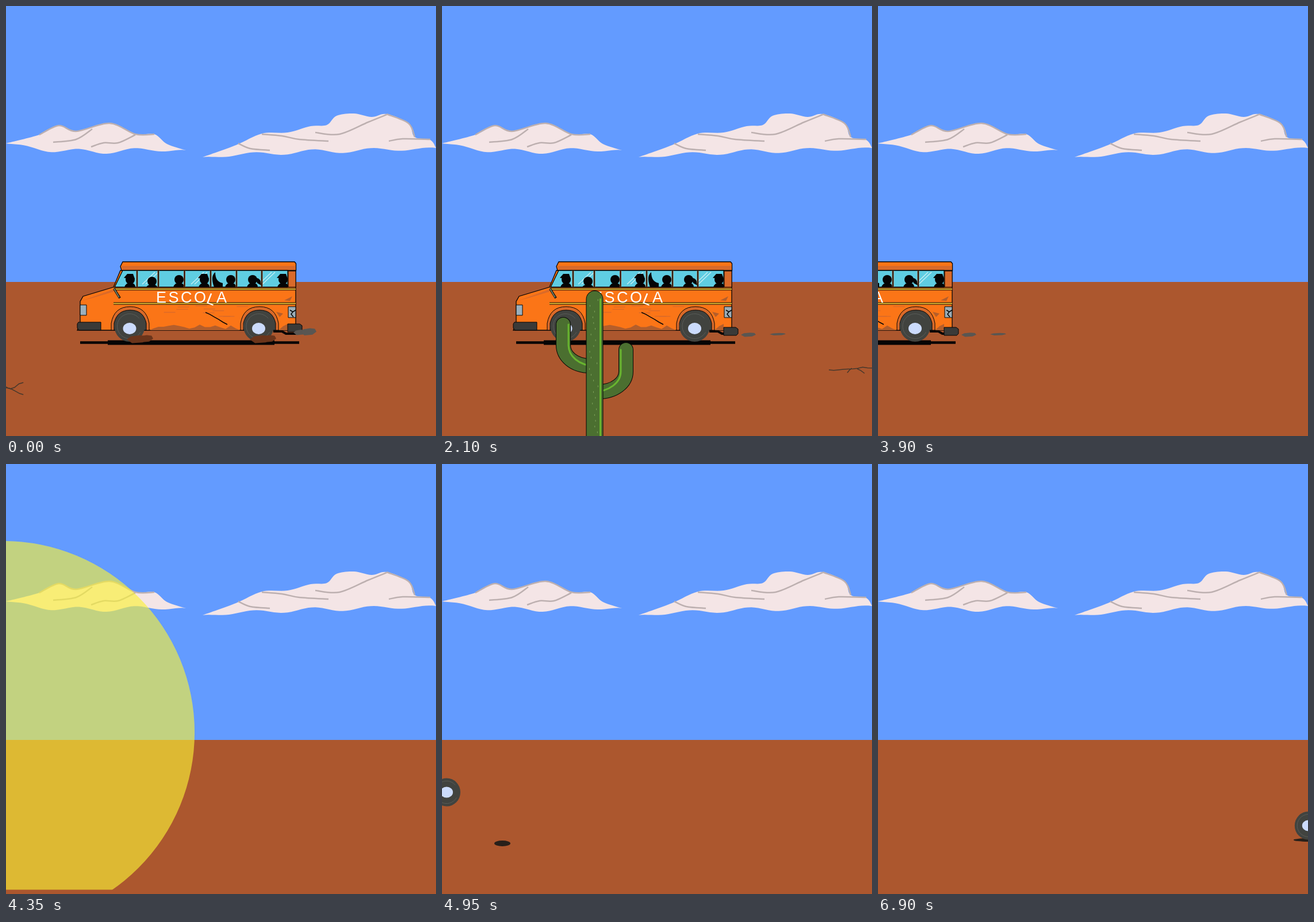
Write an HTML page with a canvas that moves like this. It is 748 px wide and 748 px high and loops after 7.05 s.

```html
<!DOCTYPE html>
<html lang="pt">
<head>
<meta charset="utf-8">
<title>School bus in the desert</title>
<style>
html, body { margin: 0; width: 100%; height: 100%; overflow: hidden; }
canvas { display: block; }
</style>
</head>
<body>
<canvas id="stage" width="748" height="748"></canvas>
<script>
const c = document.getElementById('stage').getContext('2d');
const STEP = 150, STEPS = 47;
const BLACK = '#050505', ORANGE = '#fb7517', DEEP = '#d96a2a', RUST = '#b45e2b',
      TYRE = '#41433f', HUB = '#cbdbfc', CLOUD = '#f4e5e6', SHADE = '#bdb0b0',
      SMOKE = '#595652', DUST = '#6b351b', CRACK = '#47382c', CACTUS = '#4b6f30';

const random = n => Math.abs(Math.sin(n * 12.9898) * 43758.5453) % 1;

function path(d, fill, stroke, width = 1) {
  const p = new Path2D(d);
  if (fill) { c.fillStyle = fill; c.fill(p); }
  if (stroke) { c.strokeStyle = stroke; c.lineWidth = width; c.stroke(p); }
}
function rect(x, y, w, h, fill, stroke) {
  path(`M${x},${y}h${w}v${h}h${-w}z`, fill, stroke);
}
function line(x0, y0, x1, y1, color, width) {
  path(`M${x0},${y0}L${x1},${y1}`, null, color, width);
}
function oval(x, y, rx, ry, fill, stroke) {
  path(`M${x - rx},${y}a${rx},${ry} 0 1 0 ${2 * rx},0a${rx},${ry} 0 1 0 ${-2 * rx},0z`, fill, stroke);
}
function at(x, y, draw) {
  c.save();
  c.translate(x, y);
  draw();
  c.restore();
}

// Smooth path through a few [x, y] points
function curve(pts) {
  let d = `M${pts[0]}`;
  for (let i = 0; i < pts.length - 1; i++) {
    const p = pts[i], q = pts[i + 1], before = pts[i - 1] || p, after = pts[i + 2] || q;
    const lead = [0, 1].map(j => p[j] + (q[j] - before[j]) / 6);
    const tail = [0, 1].map(j => q[j] - (after[j] - p[j]) / 6);
    d += `C${lead} ${tail} ${q}`;
  }
  return d;
}

// Top edge from points, bottom edge as a tapering ripple between its ends
function cloud(top, sag, ripple, wave, crest, creases) {
  const [x0, y0] = top[0], [x1, y1] = top[top.length - 1];
  let d = curve(top);
  for (let x = x1; x > x0; x -= 6) {
    const u = (x - x0) / (x1 - x0), taper = Math.sin(Math.PI * u);
    const y = y0 + (y1 - y0) * u + sag * taper * (1 - u)
      + ripple * Math.sqrt(taper) * Math.cos(2 * Math.PI * (x - crest) / wave);
    d += `L${x},${y}`;
  }
  path(d + 'z', CLOUD);
  for (const crease of creases) path(curve(crease), null, SHADE, 2.5);
}

function scenery() {
  rect(0, 0, 748, 480, '#639bff');
  rect(0, 480, 748, 268, '#ac572e');
  const left = [[0, 239], [58, 224], [92, 208], [122, 218], [180, 204], [225, 223], [258, 223], [280, 240], [313, 251]];
  cloud(left, 16, 4.5, 100, 75, [
    left.slice(1, 7),
    [[82, 237], [122, 232], [150, 214]],
    [[148, 245], [170, 238], [195, 238], [225, 224]]
  ]);
  const right = [[342, 263], [400, 242], [445, 222], [490, 220], [530, 209], [558, 207], [575, 191], [605, 187],
    [636, 193], [662, 188], [700, 204], [711, 228], [738, 233], [748, 247]];
  cloud(right, -4, 4, 104, 482, [
    right.slice(9, 12),
    [[404, 239], [425, 248], [459, 251]],
    [[445, 223], [480, 226], [510, 232], [561, 235]],
    [[538, 220], [580, 223], [630, 202], [662, 189]],
    [[666, 235], [690, 231], [738, 232]]
  ]);
}

function crack(x0, y0, x1, y1, color = CRACK) {
  const n = Math.ceil(Math.hypot(x1 - x0, y1 - y0) / 9);
  let d = `M${x0},${y0}`;
  for (let i = 1; i <= n; i++) {
    const jitter = i < n ? random(x0 + i) * 3 - 1.5 : 0;
    d += `L${x0 + (x1 - x0) * i / n},${y0 + (y1 - y0) * i / n + jitter}`;
  }
  path(d, null, color, 1.5);
}
function forkedCrack() {
  crack(377, 663, 465, 665);
  crack(465, 666, 488, 655);
  crack(455, 661, 488, 676);
}
function flatCrack() {
  crack(673, 633, 782, 627);
  crack(713, 630, 705, 638);
  crack(722, 631, 735, 639);
}

function bone(x0, y0, x1, y1, color, grow) {
  line(x0, y0, x1, y1, color, 4 + grow);
  for (const [x, y] of [[x0, y0], [x1, y1]])
    for (const side of [-1, 1]) oval(x - side * 1.2, y + side * 2, 2 + grow / 2, 2 + grow / 2, color);
}
function skull() {
  const bones = '#b9aaa2', ink = '#3c332f';
  oval(422, 640, 13, 4, '#87421f');
  path('M412,636Q404,626 410,621Q419,613 428,621Q434,628 427,636L425,642H413z', bones, ink, 1.2);
  for (const x of [414, 425]) oval(x, 629, 3.5, 3, ink);
  for (const x of [416, 419, 422]) line(x, 638, x, 642, ink);
  path('M419,633v3M417,619l4,3-2,3', null, ink);
  bone(384, 643, 407, 652, ink, 2);
  bone(384, 643, 407, 652, bones, 0);
}

function cactus() {
  const limbs = [
    ['M258,626C228,626 211,608 211,590V554', 24, 9],
    ['M272,671C300,671 320,655 320,636V598', 24, -9],
    ['M265.500,770V510', 28, 10]
  ];
  c.lineCap = 'round';
  for (const [d, width, edge] of limbs) {
    path(d, null, BLACK, width + 2);
    path(d, null, CACTUS, width);
    at(edge, 0, () => path(d, null, '#68b52f', 3));
  }
  c.lineCap = 'butt';
  for (let i = 0; i < 24; i++) rect(256 + 16 * random(i + 1), 510 + i * 10, 1, 3, '#7da05a');
}

function wheel(x, y, r) {
  oval(x, y, r - .5, r, TYRE);
  c.beginPath();
  c.arc(x, y, r * .8, .5, 5.6);
  c.strokeStyle = '#5a5c58';
  c.lineWidth = 1;
  c.stroke();
}

function riders(waving) {
  [216, 254, 301, 345, 391, 429, 482].forEach((x, i) => {
    const y = i === 1 ? 479 : 476;
    oval(x, y, 8, 8, BLACK);
    path(`M${x - 10},489Q${x - 8},${y + 6} ${x},${y + 5}Q${x + 9},${y + 6} ${x + 9},489z`, BLACK);
    if (i % 3 === 0) path(`M${x - 11},${y - 3}L${x - 5},${y - 10}H${x + 5}L${x + 8},${y - 1}z`, BLACK);
  });
  path('M434,473Q444,473 444,486L437,482z', BLACK);
  // raised arm
  const hand = waving ? 370 : 364;
  path(`M${hand},463Q355,470 362,489H377V482Q364,480 ${hand},463z`, BLACK);
}

function lettering() {
  c.fillStyle = '#fff';
  c.font = '27px "Liberation Sans", Arial, sans-serif';
  c.letterSpacing = '3.5px';
  c.fillText('ESCO', 261, 516);
  c.fillText('A', 366, 516);
  at(347, 516, () => { c.rotate(.38); c.fillText('L', 0, 0); });
}

function wear() {
  let rust = 'M250,564';
  for (let x = 256; x < 408; x += 9) rust += `L${x},${554 + 8 * random(x)}`;
  path(rust + 'L408,564zM474,564L482,557 490,553V564zM470,532l12,3-6,6zM484,512l14,-7-4,8z', RUST);
  for (let i = 0; i < 10; i++) {
    const x = 270 + 160 * random(i + 3), y = 520 + 25 * random(i + 40);
    line(x, y, x + 20, y, DEEP, 1.3);
  }
  crack(347, 533, 385, 554, BLACK);
}

function busBody(up) {
  // cabin and hood
  path('M199,460H504V564H124L129,550V514L134,505 187,489z', ORANGE, BLACK, 1.3);
  path('M131,513L187,493V497L150,508z', DEEP);
  path('M203,445H502L504.500,448V460H201L199,453z', ORANGE, BLACK, 1.3);
  path('M201,452H503V459H202z', DEEP);
  // windows
  path('M203,460H490V489H189z', '#5fcde2', BLACK, 1.3);
  rect(491, 461, 13, 28, DEEP, BLACK);
  for (const x of [237, 243, 322, 328, 440, 446]) line(x, 484, x + 22, 463, '#c9eff5', 1.3);
  riders(up);
  for (const x of [228, 265, 310.5, 356, 401, 445]) {
    rect(x - 1.5, 460, 3, 29, RUST);
    line(x, 460, x, 489, BLACK, 1.5);
  }
  for (const y of [492.5, 517.5]) {
    line(187, y, 504, y, BLACK, 4);
    line(187, y, 504, y, '#f6c637', 2);
  }
  line(188, 492, 198, 508, BLACK, 4);
  line(188, 492, 197, 507, '#73806c', 2);
  wear();
  lettering();
  // lamps, front bumper, wheel arches
  rect(129, 520, 11, 18, '#9bb0bd', BLACK);
  rect(491, 523, 13, 19, '#9badb7', BLACK);
  path('M494,529l5,3-3,4 4,5M499,532l5,-3', null, BLACK, 1.5);
  path('M126,550H165V564H127L124,560V553z', '#3a3a38', BLACK);
  for (const x of [216, 441]) {
    for (const [r, top, color] of [[33, 523, DEEP], [28, 529, TYRE]])
      path(`M${x - r},564V552Q${x - r + 5},${top} ${x},${top}Q${x + r - 5},${top} ${x + r},552V564z`, color, BLACK);
  }
}

function puff(x, y, w, h, color) {
  path(`M${x},${y}l${w * .2},${-h * .4} ${w * .4},${-h * .15} ${w * .3},${h * .1} ${w * .1},${h * .4} ${-w * .25},${h * .45} ${-w * .5},${h * .1}z`, color);
}
function exhaust(age) {
  if (age > 2) return;
  puff(500 + 5 * age * age, 568 + 2 * age, 22 + 2 * age, 9 - age, SMOKE);
  puff(512 + 5 * age + 12 * age * age, 567 + 2 * age, 28, 12 - 4 * age, SMOKE);
}
function wheelDust(k) {
  const size = 1 - k / 9;
  if (size < .2) return;
  for (const x of [210, 424]) {
    puff(x + k * 3, 580, 37 * size, 13 * size, DUST);
    puff(x + 18 + k * 2, 579, 28 * size, 12 * size, DUST);
  }
}

function bus(k) {
  const phase = k % 4, up = phase % 2;
  line(129, 585.5, 510, 585.5, BLACK, 4.5);
  line(177, 585.5, 467, 585.5, BLACK, 8);
  path('M465,566H480L487,570H505', null, BLACK, 4);
  at(0, up ? -1.5 : 0, () => busBody(up));
  at(0, [0, -4, 6, 1][phase], () => path('M490,553H511L515,556V564L512,567H490z', '#3a3a38', BLACK));
  for (const x of [215, 439.5]) {
    wheel(x, 557, 27);
    oval(x, 561, 11.5, 10, HUB);
  }
  wheelDust(k);
  exhaust(phase);
}

// Blast from beyond the left edge
function explosion(n) {
  if (n < 0 || n > 3) return;
  const r = 190 * 1.753 ** n;
  c.save();
  c.beginPath();
  c.rect(0, 0, 748, n < 2 ? 740.5 : 748);
  c.clip();
  c.globalAlpha = .63;
  oval(-5, Math.max(440, 505.5 - 38.5 * n), r, r, '#fbf236');
  c.restore();
}

function looseWheel(k) {
  if (k < 33) return;
  const x = k < 42 ? 8 + (k - 33) * 67.5 : 616 + (k - 42) * 33.2;
  const drop = Math.max(0, 35 - k);
  const hop = k > 35 && k < 42 ? 34 * Math.sin(Math.PI * (k - 35) / 7) : 0;
  const height = drop * 29 + hop, near = Math.max(0, 1 - height / 58);
  oval(x + drop * 48.5, 654 + Math.max(0, 42 - k) * .67, 14 + 12 * near, 5 - 2 * near, '#27201a');
  wheel(x, 629 - height, 24.5);
  oval(x, 629 - height, 11, 9.5, HUB);
}

function draw(k) {
  scenery();
  if (k < 22) {
    at((k - 6) * 76.3, 0, () => { forkedCrack(); skull(); });
    at((k - 14) * 95, 0, flatCrack);
  }
  if (k < 28) at(-15 * Math.max(0, k - 21) ** 2, 0, () => bus(k));
  if (k < 21) at((k - 14) * 92, 0, cactus);
  explosion(k - 28);
  looseWheel(k);
}

const start = performance.now();
function tick() {
  draw(Math.floor((performance.now() - start) / STEP) % STEPS);
  requestAnimationFrame(tick);
}
tick();
</script>
</body>
</html>
```
